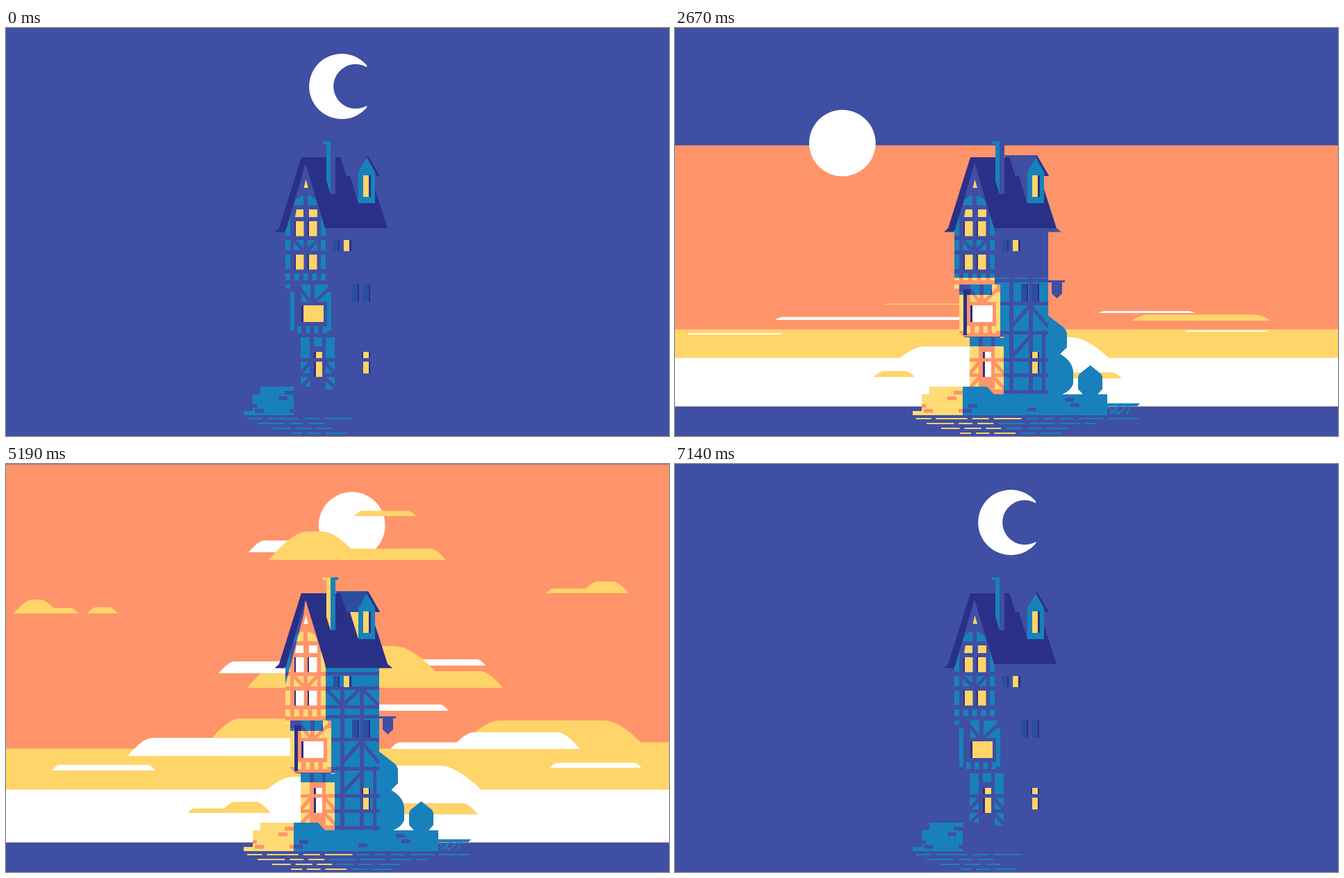
Write an HTML page with a canvas that moves like this. It is 954x587 px and loops after 7170 ms.

```html
<!DOCTYPE html>
<html lang="en">
<head>
<meta charset="utf-8">
<style>
html, body { margin: 0; width: 100%; height: 100%; overflow: hidden; background: #3f4fa3; }
canvas { display: block; }
</style>
</head>
<body>
<canvas id="stage" width="954" height="587"></canvas>
<script>
const ctx = document.getElementById('stage').getContext('2d');
const LOOP = 7170, HORIZON = 544.5;
const BLUE = '#3f4fa3', DARK = '#2a3087', TEAL = '#1881bb', SLATE = '#2b4ea0';
const ORANGE = '#ff946a', YELLOW = '#ffd469', PALE = '#ffdb75', WHITE = '#fff';

// Timing
const clamp = (v, lo = 0, hi = 1) => Math.max(lo, Math.min(hi, v));
const phase = (t, start, length) => clamp((t - start) / length);
const easeIn = u => u * u;
const easeOut = u => 1 - (1 - u) ** 2;
const easeBoth = u => u * u * (3 - 2 * u);

// Smooth monotone curve through [time, value] keys, flat outside them.
function track(keys) {
  const last = keys.length - 1;
  const slope = i => (keys[i + 1][1] - keys[i][1]) / (keys[i + 1][0] - keys[i][0]);
  const tangent = i => i === 0 || i === last ? 0 : 2 / (1 / slope(i - 1) + 1 / slope(i));
  return t => {
    t = clamp(t, keys[0][0], keys[last][0]);
    let i = 0;
    while (t > keys[i + 1][0]) i++;
    const [t0, a] = keys[i], [t1, b] = keys[i + 1];
    const d = t1 - t0, u = (t - t0) / d, v = 1 - u;
    return a * v * v * (1 + 2 * u) + b * u * u * (3 - 2 * u)
      + d * u * v * (tangent(i) * v - tangent(i + 1) * u);
  };
}
const sunAngle = track([[1740, -115], [1950, -97.2], [2670, -39], [3450, -11.4], [5190, 3.7], [6000, 55.7], [6700, 118]]);
const moonAngle = track([[1020, 0.8], [1740, 27], [1950, 53], [2350, 115], [5450, 245], [6000, 313], [7140, 360.8]]);

const orangeBand = t => 544 * (easeBoth(phase(t, 1600, 1700)) - easeBoth(phase(t, 5235, 1550)));
const yellowBand = t => 135 * (easeOut(phase(t, 1660, 1750)) - easeBoth(phase(t, 5550, 1300)));
const whiteBand = t => 76 * (easeOut(phase(t, 1785, 1235)) - easeBoth(phase(t, 5550, 1300)));

// Daylight climbs the house at a steady pace and later drops faster.
const lightLine = t => clamp(Math.max(487 - (t - 1950) * 0.1767, 302 + (t - 6000) * 0.337), 160, 590);

// Drawing helpers
function rects(color, ...list) {
  ctx.fillStyle = color;
  for (const r of list) ctx.fillRect(...r);
}
function shape(color, path) {
  ctx.fillStyle = color;
  ctx.fill(new Path2D(path));
}
function lines(color, width, path) {
  ctx.strokeStyle = color;
  ctx.lineWidth = width;
  ctx.stroke(new Path2D(path));
}
function clipped(path, draw) {
  ctx.save();
  ctx.clip(new Path2D(path));
  draw();
  ctx.restore();
}
const below = y => `M0 ${y}H954V587H0Z`;
const above = y => `M0 0H954V${y}H0Z`;

// Clouds: colour, baseline, left, right, height, and a low tail to the right (or left if negative).
const clouds = [
  [WHITE, 127, 349, 470, 17],
  [YELLOW, 138, 378, 511, 41, 122],
  [YELLOW, 75, 501, 590, 8],
  [YELLOW, 215, 11, 76, 20, 28],
  [YELLOW, 215, 117, 161, 9],
  [YELLOW, 186, 828, 896, 17, -51],
  [WHITE, 290, 540, 690, 9],
  [YELLOW, 322, 347, 520, 41],
  [YELLOW, 322, 440, 640, 60, 75],
  [WHITE, 301, 306, 450, 17],
  [WHITE, 355, 500, 637, 9],
  [YELLOW, 398, 293, 520, 32],
  [YELLOW, 421, 640, 932, 52, 170],
  [WHITE, 420, 175, 500, 26],
  [WHITE, 410, 640, 826, 24, -87],
  [WHITE, 441, 66, 215, 8],
  [WHITE, 437, 783, 914, 7],
  [YELLOW, 502, 308, 381, 16, -46],
  [YELLOW, 504, 540, 679, 16]
];
const horizonClouds = [[WHITE, 500, 345, 560, 50], [WHITE, 500, 470, 713, 66]];

function hump(color, base, left, right, h) {
  const top = base - h, a = h * 0.85, b = h * 1.35;
  shape(color, `M${left} ${base}Q${left + a} ${top} ${left + b} ${top}H${right - b}Q${right - a} ${top} ${right} ${base}Z`);
}

// Clouds slide up from behind their baseline and drift right.
function drawCloud([color, base, left, right, h, tail = 0], t, shown) {
  if (shown <= 0) return;
  const drift = (t - 5190) * (color === WHITE ? 0.0216 : 0.0115);
  clipped(above(base), () => {
    ctx.translate(drift, h * (1 - shown));
    hump(color, base, left, right, h);
    if (tail > 0) hump(color, base, right - h * 1.6, right + tail, h * 0.4);
    if (tail < 0) hump(color, base, left + tail, left + h * 1.6, h * 0.4);
  });
}
function cloudLevel(base, t) {
  const rise = easeOut(phase(t, 2390 + (502 - base) * 2.5, 900));
  const fall = easeIn(phase(t, 5070 + (base - 75) * 1.5, 600));
  return rise * (1 - fall);
}

function orbit(x, radius, degrees) {
  const a = degrees * Math.PI / 180;
  return [x + radius * Math.sin(a), 454 - radius * Math.cos(a)];
}
function drawSun(t) {
  const angle = sunAngle(t);
  ctx.beginPath();
  ctx.arc(...orbit(474, 367 - angle * 0.1, angle), 47.8, 0, 7);
  ctx.fill();
}
function drawMoon(t) {
  const [x, y] = orbit(478, 370, moonAngle(t));
  ctx.beginPath();
  ctx.arc(x, y, 47, 0.698, -0.698);
  ctx.arc(x + 20, y, 32, -1.047, 1.047, true);
  ctx.fill();
}

function drawSky(t) {
  clipped(above(HORIZON), () => {
    const bands = [[ORANGE, orangeBand(t)], [YELLOW, yellowBand(t)], [WHITE, whiteBand(t)]];
    for (const [color, h] of bands) rects(color, [0, HORIZON - h, 954, h]);
    drawSun(t);
    drawMoon(t);
    const level = (whiteBand(t) / 76) ** 2 * 1.07 - 0.07;
    for (const c of horizonClouds) drawCloud(c, t, level);
    for (const c of clouds) drawCloud(c, t, cloudLevel(c[1], t));
  });
}

// A window pane with its dark reveal on one side.
function pane(glass, x, y, w, h, reveal = -2) {
  rects(DARK, reveal < 0 ? [x + reveal, y, -reveal, h] : [x + w, y, reveal, h]);
  rects(glass, [x, y, w, h]);
}

const TREES = 'M537 414L559 431Q564 436 564 442V459L554 469Q573 480 573 497V512Q569 522 557 527H537Z'
  + 'M597.5 485.5L612 497Q615 500 615 505V519L608 527H587L580 519V505Q580 500 583 497Z';

function drawSide(wall) {
  clipped('M460 293H537V527H460Z', () => {
    rects(wall, [460, 293, 77, 234]);
    for (const y of [299, 320, 347, 361, 394, 436, 475, 497, 521]) rects(BLUE, [460, y, 77, 5]);
    for (const x of [481, 509]) rects(BLUE, [x, 320, 6, 207]);
    rects(BLUE, [528, 435, 5, 92]);
    lines(BLUE, 5, 'M460 323L484 348L511 322L537 348M484 430L511 399L537 430M484 474L511 444');
  });
  pane(SLATE, 471, 305, 7, 16, 2);
  pane(YELLOW, 486, 305, 8, 16, 3);
  for (const x of [498, 514]) pane(SLATE, x, 368, 8, 26, 2);
  pane(YELLOW, 514, 466, 8, 9);
  pane(YELLOW, 514, 466, 8, 9, 2);
  pane(YELLOW, 514, 480, 8, 17, 2);
}

const FRONT = 'M431 195L460 288V369H468V436L473 445V527H424V445H417L409 436V375H402V288Z';
// Parts of the front that sunlight reaches past the eaves and overhangs.
const SUNLIT = 'M431 195L462 293V369H468V446H474V527H424V458H473V444H409V384H456V369H409V380H402V318L428 218Z';

function drawFront(wall, timber, glass) {
  shape(timber, FRONT);
  clipped(FRONT, () => {
    // Tower
    shape(wall, 'M428 241Q416 243 414 255H428ZM434 241Q446 243 448 255H434Z');
    for (const x of [402, 453]) rects(wall, [x, 262, 7, 37], [x, 305, 7, 15], [x, 326, 7, 21]);
    for (const x of [414, 434]) rects(wall, [x, 305, 14, 15]);
    for (let i = 0; i < 5; i++) rects(wall, [402 + i * 12.8, 353, 7, 10]);
    // Bay
    rects(wall, [402, 369, 7, 6], [425, 369, 13, 25], [444, 369, 19, 25]);
    for (const x of [409, 462]) rects(wall, [x, 380, 6, 56]);
    for (let i = 0; i < 4; i++) rects(wall, [419 + i * 12.3, 429, 6, 10]);
    // Ground floor
    rects(wall, [443, 445, 12, 13]);
    for (const x of [424, 460]) rects(wall, [x, 445, 13, 30], [x, 480, 13, 17], [x, 502, 13, 18]);
    // Braces
    lines(timber, 5, 'M412 303L430 322M450 303L432 322M423 375L440 396M465 375L442 396'
      + 'M422 499L439 480M475 499L458 480M422 520L440 501M475 520L457 501');
  });
  shape(glass, 'M431.5 218L435 230H428.5ZM418 261H428V272H416ZM436 261H448V272H436Z');
  for (const x of [417, 436]) for (const y of [278, 326]) pane(glass, x, y, 11.5, 21.5);
  pane(glass, 428, 399, 29, 24, -3);
  for (const [y, h] of [[466, 9], [480, 22]]) pane(glass, 446, y, 9, h, -3);
}

function drawRoof(day) {
  shape(day ? SLATE : BLUE, 'M474 183H521L538 213H490Z');
  shape(day ? YELLOW : BLUE, 'M494 213H509V252H507Z');
  shape(day ? DARK : BLUE, 'M459 288H549L556 293.5H460Z');
  shape(DARK, 'M425 186H481L490 213H495L507 252H531V232L549 288H459L431 195L403 290L401 293.5H387L393 288Z');
  shape(DARK, 'M519 184H521L538 213H533Z');
  shape(TEAL, 'M519 187L531 207V252H507V207Z');
  pane(YELLOW, 514, 212, 8, 31, 3);
  const lit = day ? YELLOW : TEAL, shade = day ? TEAL : BLUE;
  rects(shade, [467, 163, 11, 4], [467, 163, 7, 76]);
  shape(lit, 'M456 163H467V239L461 220V167H456Z');
}

function drawIsland(left, leftBrick, right) {
  shape(right, 'M413 516H449L459 527H622V540H669L665 544H622V557H413Z');
  lines(right, 2, 'M623 545L634 555M626 555L640 544M633 545L637 555L650 544M650 555L655 544');
  shape(left, 'M366 516H414V557H342V551H355V527H366Z');
  const bricks = (color, ...at) => rects(color, ...at.map(([x, y]) => [x, y, 13, 5.5]));
  bricks(BLUE, [422, 541], [414, 548], [507, 546], [561, 532], [569, 540]);
  clipped('M355 516H414V557H355Z', () => bricks(leftBrick, [401, 522], [392, 530], [348, 541], [358, 548], [408, 548]));
}

const noise = n => Math.abs(Math.sin(n * 78.233) * 43758.5453) % 1;

// Rows of dashes that narrow with distance from the shore.
function drawRipples(left, right) {
  for (let row = 0; row < 4; row++) {
    const end = 676 - 85 * row + 15 * row * row;
    let x = 347 + 12 * row + 3 * row * row;
    for (let i = 1; x < end - 8; i++) {
      const w = Math.min(16 + 30 * noise(row * 17 + i), end - x);
      rects(x < 460 ? left : right, [x, 561 + row * 7, w, 2]);
      x += w + 7;
    }
  }
}

function drawScene(t) {
  const light = lightLine(t);
  rects(BLUE, [0, 0, 954, 587]);
  ctx.fillStyle = WHITE;
  drawSky(t);
  shape(BLUE, TREES);
  clipped(below(light + 25), () => shape(TEAL, TREES));

  drawSide(BLUE);
  drawFront(TEAL, BLUE, YELLOW);
  drawRoof(false);
  drawIsland(TEAL, BLUE, BLUE);
  drawRipples(TEAL, BLUE);

  clipped(below(light), () => {
    drawSide(TEAL);
    drawFront(TEAL, BLUE, YELLOW);
    rects(DARK, [415, 376, 10, 8], [455, 376, 8, 8]);
    clipped(SUNLIT, () => drawFront(PALE, ORANGE, WHITE));
    rects(DARK, [415, 376, 5, 66]);
    drawRoof(true);
    drawIsland(PALE, ORANGE, TEAL);
    drawRipples(YELLOW, TEAL);
  });

  rects(BLUE, [533, 363, 28, 3]);
  shape(BLUE, 'M542 366H557V382L549.5 389L542 382Z');
}

function frame() {
  drawScene(performance.now() % LOOP);
  requestAnimationFrame(frame);
}
frame();
</script>
</body>
</html>
```
